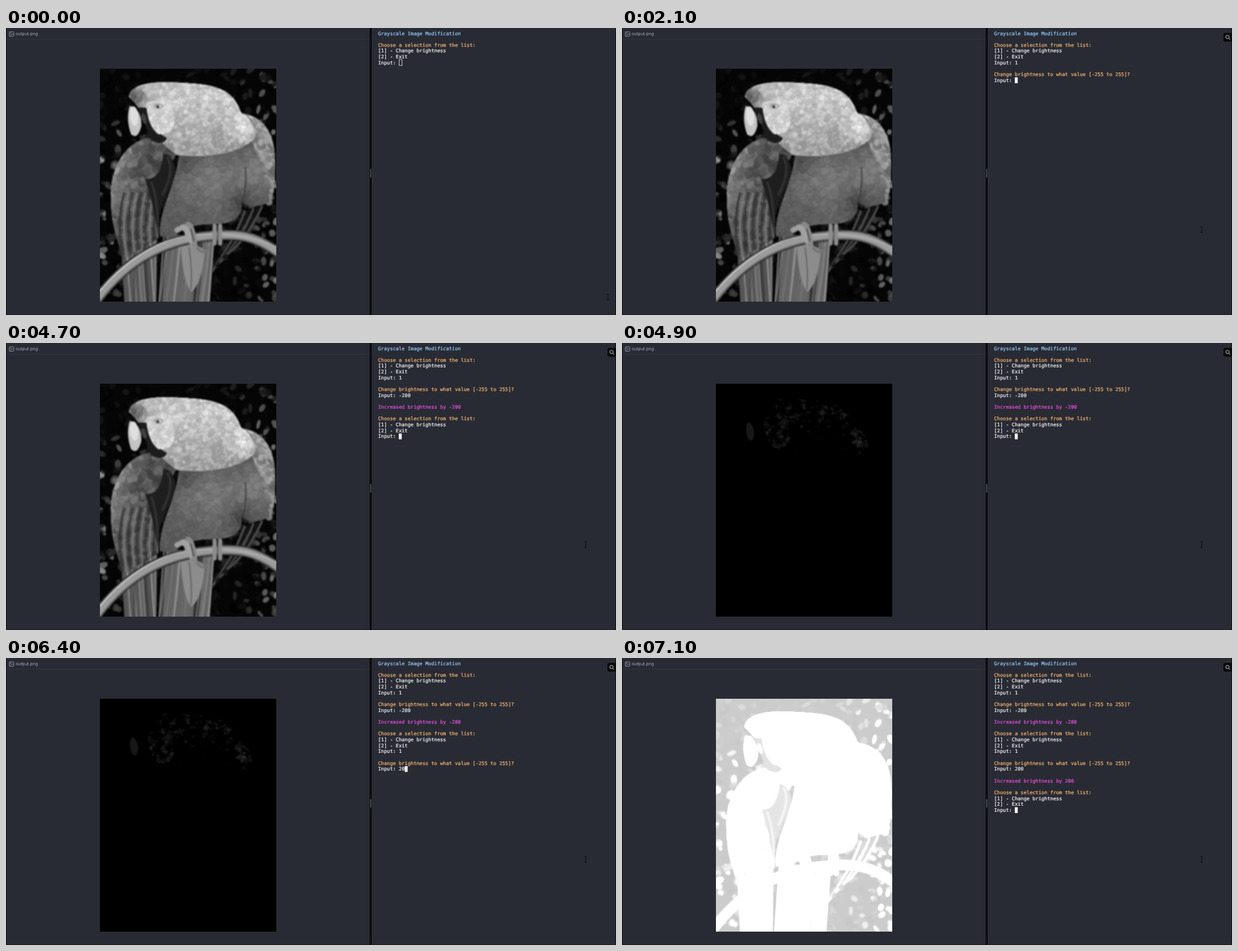
These frames come from a looping animation (1000x472 px, 7.2 s). An HTML page with a canvas:

```html
<!DOCTYPE html>
<html lang="en">
<head>
<meta charset="utf-8">
<title>Grayscale Image Modification</title>
<style>
  html, body { margin: 0; width: 100%; height: 100%; overflow: hidden; background: #0d0e12; }
  #stage { position: relative; width: 1000px; height: 472px; overflow: hidden; }
  #stage > svg { position: absolute; inset: 0; }
  #photo { position: absolute; left: 154px; top: 66.5px; width: 288.5px; height: 383.5px; }
  #photo.dim { filter: url(#dim); }
  #photo.bright { filter: url(#bright); }
  .tab { font: 7.1px Inter, sans-serif; fill: #a9abb4; }
  #term { font: 8.05px "DejaVu Sans Mono", monospace; text-rendering: geometricPrecision; stroke-width: .22; }
  .title { fill: #93c9f7; stroke: #93c9f7; }
  .ask { fill: #f5b670; stroke: #f5b670; }
  .plain { fill: #f4f4f6; stroke: #f4f4f6; }
  .done { fill: #e650df; stroke: #e650df; }
</style>
</head>
<body>
<div id="stage">
  <svg width="1000" height="472" viewBox="0 0 1000 472">
    <defs>
      <filter id="dim" color-interpolation-filters="sRGB" x="0" y="0" width="1" height="1">
        <feComponentTransfer>
          <feFuncR type="linear" intercept="-.784"/><feFuncG type="linear" intercept="-.784"/><feFuncB type="linear" intercept="-.784"/>
        </feComponentTransfer>
      </filter>
      <filter id="bright" color-interpolation-filters="sRGB" x="0" y="0" width="1" height="1">
        <feComponentTransfer>
          <feFuncR type="linear" intercept=".784"/><feFuncG type="linear" intercept=".784"/><feFuncB type="linear" intercept=".784"/>
        </feComponentTransfer>
      </filter>
    </defs>
    <rect x="1" width="595" height="471.5" fill="#292b34"/>
    <rect x="600" width="399" height="471.5" fill="#292b34"/>
    <path d="M1 18.5H596" stroke="#32343e"/>
    <path d="M600.5 0V472" stroke="#33353d"/>
    <path d="M598 232V246" stroke="#5a5c64" stroke-width="1.6"/>
    <g fill="none" stroke="#a0a2ab" stroke-width=".8">
      <rect x="5.4" y="6.2" width="7.4" height="7.4" rx="1"/>
      <circle cx="7.7" cy="8.5" r=".7"/>
      <path d="M6.2 13.4L10.5 9.4L12.7 11.4"/>
    </g>
    <text class="tab" x="15.8" y="12.4">output.png</text>
    <g id="term"></g>
    <rect id="caret" width="4.8" height="9.6"/>
    <g id="search">
      <rect x="986" y="8" width="17" height="14.5" rx="3" fill="#08090b"/>
      <g fill="none" stroke="#c9cad0"><circle cx="992.6" cy="14.8" r="2.8"/><path d="M994.7 17L997 19.2"/></g>
    </g>
    <path id="mouse" d="M-2 -5Q0 -5 0 -3.8Q0 -5 2 -5M0 -4V4M-2 5Q0 5 0 3.8Q0 5 2 5" fill="none" stroke="#08090b" stroke-width=".9"/>
  </svg>
  <canvas id="photo" width="289" height="384"></canvas>
</div>
<script>
const $ = id => document.getElementById(id);

// ---- Photo: soft shapes in stage coordinates, textured by rules ----
const LEFT = 154, TOP = 66, WIDTH = 289, HEIGHT = 384;
let seed = 41;
const rnd = () => (seed = (seed * 16807) % 2147483647) / 2147483647;
const jitter = amount => (rnd() * 2 - 1) * amount;
const gray = (v, a = 1) => `rgba(${v | 0},${v | 0},${v | 0},${a})`;
const near = (x, y, cx, cy, r) => Math.exp(-((x - cx) ** 2 + (y - cy) ** 2) / (r * r));

const sheet = document.createElement('canvas');
sheet.width = WIDTH;
sheet.height = HEIGHT;
const g = sheet.getContext('2d');
g.translate(-LEFT, -TOP);

function oval(x, y, rx, ry, angle, tone, alpha) {
  g.fillStyle = gray(tone, alpha);
  g.beginPath();
  g.ellipse(x, y, rx, ry, angle, 0, 7);
  g.fill();
}
function fill(d, tone) {
  g.fillStyle = gray(tone);
  g.fill(new Path2D(d));
}
function stroke(d, width, tone, alpha = 1) {
  g.lineWidth = width;
  g.strokeStyle = gray(tone, alpha);
  g.stroke(new Path2D(d));
}
function inside(d, draw) {
  g.save();
  g.clip(new Path2D(d));
  draw();
  g.restore();
}
// Rows of feathers from the bottom up, each with a darker rim; tone(x, y) gives the light.
function feathers(d, size, angle, spread, tone) {
  inside(d, () => {
    for (let y = TOP + HEIGHT; y > TOP; y -= size)
      for (let x = LEFT; x < LEFT + WIDTH; x += size) {
        const cx = x + jitter(size), cy = y + jitter(size), v = tone(cx, cy) + jitter(spread), a = angle + jitter(.3);
        oval(cx, cy + 1, size, size * 1.5, a, v * .85, .75);
        oval(cx, cy, size * .9, size * 1.4, a, v, .8);
      }
  });
}
// Long parallel quills with alternating light and dark barbs.
function quills(d, base, slant, lo, hi) {
  fill(d, base);
  inside(d, () => {
    for (let x = LEFT - 60; x < LEFT + WIDTH + 60; x += 5)
      stroke(`M${x} 240Q${x} 340 ${x + slant + jitter(5)} 456`, 2 + rnd() * 3, lo + (hi - lo) * rnd(), .8);
  });
}

function foliage() {
  g.fillStyle = gray(5);
  g.fillRect(LEFT, TOP, WIDTH, HEIGHT);
  for (let i = 0; i < 900; i++) {
    const x = LEFT + rnd() * WIDTH, y = TOP + rnd() * HEIGHT;
    const edge = ((x - 298) / 144) ** 2, lit = x > 298 || y > 155 ? 170 * edge : 0;
    oval(x, y, 4 + rnd() * 5, 3 + rnd() * 3, rnd() * 3, rnd() < .5 ? rnd() * 12 : 30 * rnd() + lit * rnd(), .7);
  }
}

function tail() {
  quills('M188 345H248L246 452H194Z', 85, 6, 20, 165);
  quills('M258 340H342L334 452H250Z', 100, -14, 30, 165);
  fill('M286 355Q305 350 326 365Q322 420 304 434Q290 420 286 355Z', 140);
  stroke('M300 360Q306 400 303 430', 1.2, 75);
  for (let i = 0; i < 5; i++)
    stroke(`M${392 + i * 7} ${300 - i * 2}Q${374 + i * 5} 350 ${338 + i * 6} ${400 - i * 7}`, 4, i % 2 ? 20 : 72);
}

const RIGHT_WING = 'M382 140C410 140 440 160 441 215S436 280 430 292Q395 260 388 185Z';
const LEFT_WING = 'M248 180C205 176 172 220 172 275S185 350 192 380L250 345Q246 270 280 205Z';
const BODY = 'M285 200L400 178C415 215 425 250 432 285Q405 300 386 285Q390 322 340 322T276 344L252 342C252 290 280 260 285 200Z';
const HEAD = 'M201 112C206 88 250 88 270 88C320 92 370 88 385 138Q408 152 408 180C385 205 330 214 280 208Q255 190 236 165Q222 130 201 112Z';

function wings() {
  feathers(RIGHT_WING, 5, -.3, 38, (x, y) => 165 - (y - 150) * .35);
  quills(LEFT_WING, 90, 12, 40, 135);
  feathers(LEFT_WING + 'M0 0', 6, .4, 26, (x, y) => {
    const rim = 172 + Math.max(0, 275 - y) ** 2 / 250;
    return 75 + 75 * Math.exp(-Math.max(0, x - rim) / 28) * Math.min(1, Math.max(.2, (340 - y) / 70));
  });
  inside(LEFT_WING, () => {
    for (let x = 186; x < 256; x += 7)
      stroke(`M${x + 8} 270Q${x - 6} 320 ${x + 6} 380`, 3 + rnd() * 2, x % 2 ? 125 : 48, .75);
  });
  fill('M258 205Q292 220 268 265T250 345Q240 280 228 248Q255 250 258 205Z', 30);
  stroke('M264 212Q278 232 256 275M238 252Q248 280 249 320', 4, 62, .6);
}

function body() {
  fill(BODY, 100);
  feathers(BODY, 7, .25, 9, (x, y) =>
    98 + 30 * near(x, y, 330, 245, 45) + 28 * near(x, y, 405, 230, 35) - 22 * near(x, y, 300, 215, 25) - 25 * near(x, y, 384, 280, 20));
  stroke('M392 228Q396 262 386 290', 3, 50, .6);
}

function head() {
  fill(HEAD, 175);
  feathers(HEAD, 4.5, .5, 26, (x, y) =>
    212 - Math.max(0, y - 122) * .55 + 45 * near(x, y, 392, 160, 20) - 115 * near(x, y, 210, 112, 20));
  fill('M216 130H230Q238 168 264 180Q258 194 238 184Z', 28);
  const face = 'M230 122Q270 108 275 142T250 174Q232 160 230 122Z';
  fill(face, 225);
  feathers(face, 5, .5, 18, () => 224);
  fill('M203 127Q222 132 222 160Q216 184 205 174Q196 148 203 127Z', 196);
  oval(210, 144, 7, 16, -.1, 226, .9);
  oval(226, 148, 4, 9, -.3, 75, .8);
  stroke('M243 127Q250 121 257 128Q251 135 243 127', 1.2, 130);
  oval(249, 128.5, 2.4, 2.4, 0, 55, 1);
}

function perch() {
  const arc = 'M148 448C200 378 260 351 320 343S410 341 450 372';
  [[18, 30], [15, 105], [10, 155]].forEach(([width, tone]) => stroke(arc, width, tone));
  stroke('M152 435C187 391 228 364 264 350', 1.6, 222);
  stroke('M264 350C300 338 380 328 446 362', 2, 180);
  g.lineCap = 'round';
  for (let i = 0; i < 3; i++)
    stroke(`M${280 + i * 9} ${332 - i * 5}Q${296 + i * 5} 322 ${298 + i * 6} ${344 + i * 7}`, 8, 150 + jitter(15));
  stroke('M342 325V354M351 325V354', 7, 140);
  stroke('M303 330L308 350M347 326V352', 1.3, 50);
  stroke('M314 362Q322 374 333 362', 4, 115);
}

[foliage, tail, wings, body, head, perch].forEach(draw => draw());

const photo = $('photo'), view = photo.getContext('2d');
view.drawImage(sheet, 0, 0);
view.filter = 'blur(1px)';
view.drawImage(sheet, 0, 0);

// ---- Terminal session: [time, row, text, style], text is appended to its row ----
const CHAR = 4.847, LINE = 9.66, MARGIN = 610;
const menu = (t, row) => [
  [t, row, 'Choose a selection from the list:', 'ask'],
  [t, row + 1, '[1] - Change brightness', 'plain'],
  [t, row + 2, '[2] - Exit', 'plain'],
  [t, row + 3, 'Input: ', 'plain']
];
const prompt = (t, row) => [
  [t, row, 'Change brightness to what value [-255 to 255]?', 'ask'],
  [t, row + 1, 'Input: ', 'plain']
];
const type = (t, step, row, text) => [...text].map((key, i) => [t + i * step, row, key, 'plain']);
const result = (t, row, value) => [[t, row, 'Increased brightness by ' + value, 'done'], ...menu(t, row + 2)];
const session = [
  [0, 0, 'Grayscale Image Modification', 'title'], ...menu(0, 2),
  ...type(1300, 0, 5, '1'), ...prompt(1700, 7),
  ...type(3000, 200, 8, '-2'), ...type(4000, 200, 8, '00'), ...result(4600, 10, '-200'),
  ...type(5700, 0, 15, '1'), ...prompt(5900, 17),
  ...type(6300, 100, 18, '200'), ...result(6800, 20, '200')
];

const rows = Array.from({ length: 26 }, (_, i) => {
  const row = document.createElementNS('http://www.w3.org/2000/svg', 'text');
  set(row, { x: MARGIN, y: 11.5 + LINE * i });
  return $('term').appendChild(row);
});

function set(el, attrs) {
  for (const name in attrs) el.setAttribute(name, attrs[name]);
}

function render(t) {
  const lines = rows.map(() => '');
  let last = 0;
  for (const [time, row, text, style] of session) {
    if (time > t) break;
    lines[row] += text;
    rows[row].setAttribute('class', style);
    last = row;
  }
  rows.forEach((row, i) => { if (row.textContent !== lines[i]) row.textContent = lines[i]; });

  const focused = t >= 1000, inset = focused ? 0 : .5;
  set($('caret'), {
    x: MARGIN + CHAR * lines[last].length + inset, y: 3.9 + LINE * last - inset / 2,
    fill: focused ? '#f6f6f8' : 'none', stroke: focused ? 'none' : '#d8d9dd', 'stroke-width': .9
  });

  const away = (1 - Math.min(t / 800, 1)) ** 2;
  set($('mouse'), { transform: `translate(${950.3 + 36.7 * away} ${331.5 + 111.5 * away})` });
  set($('search'), { visibility: t >= 100 ? 'visible' : 'hidden' });
  photo.className.baseVal;
  photo.className = t < 4900 ? '' : t < 7000 ? 'dim' : 'bright';
}

const start = performance.now();
function tick() {
  render((performance.now() - start) % 7200);
  requestAnimationFrame(tick);
}
tick();
</script>
</body>
</html>
```
